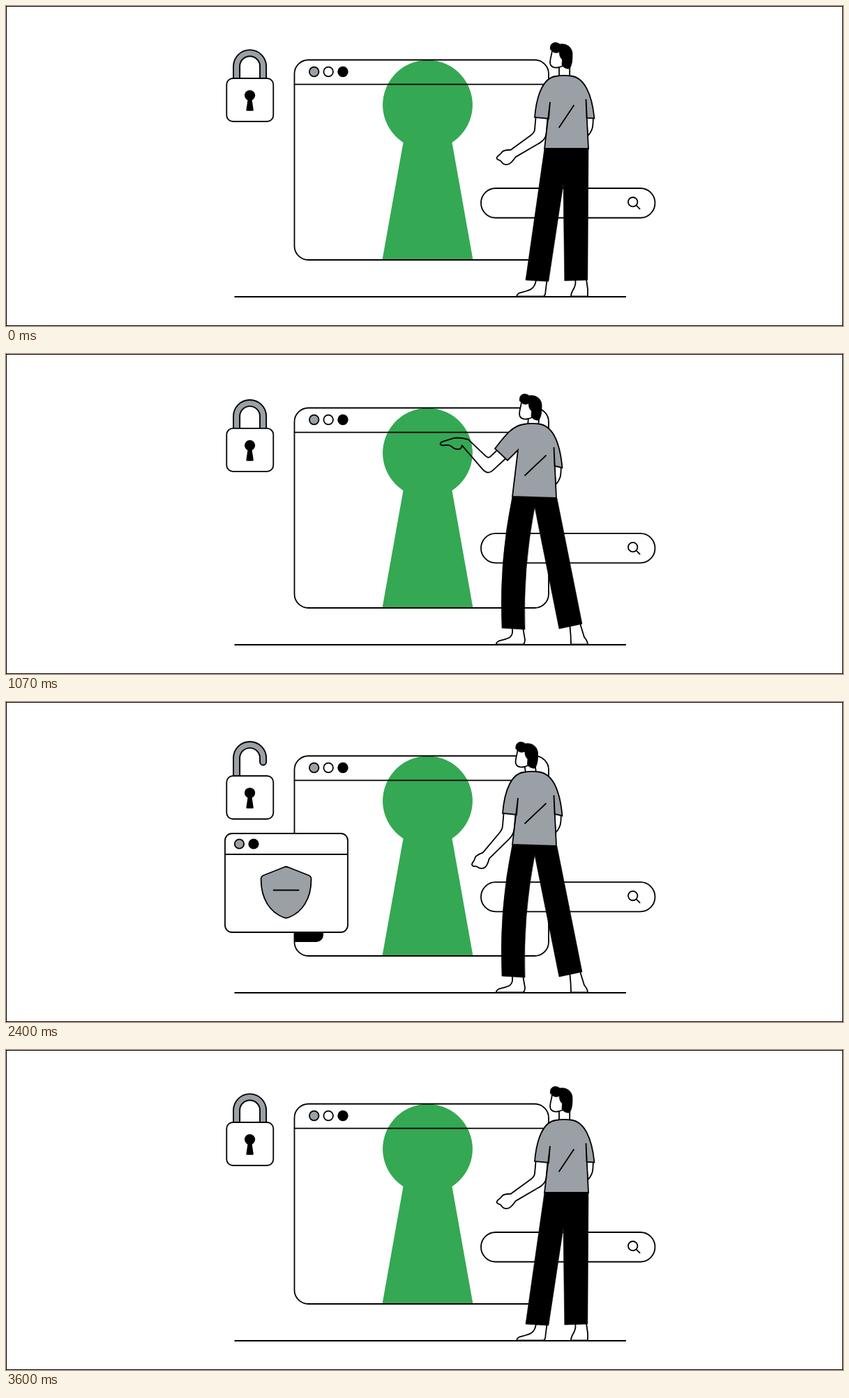
Write an HTML page that moves like this. It is 1200 px wide and 460 px high and loops after 3630 ms.

```html
<!DOCTYPE html>
<html lang="en">
<head>
<meta charset="utf-8">
<title>Unlocking the browser</title>
<style>
  html, body { margin: 0; width: 100%; height: 100%; overflow: hidden; background: #fff; }
  svg { display: block; width: 100%; height: 100%; }
  .ln { fill: none; stroke: #000; stroke-width: 1.8; stroke-linecap: round; stroke-linejoin: round; }
  .w { fill: #fff; }
  .g { fill: #9aa0a6; }
  .k { fill: #000; }
  #green { fill: #34a853; mix-blend-mode: multiply; }
</style>
</head>
<body>
<svg viewBox="0 0 1200 460">
  <defs>
    <clipPath id="inside"><rect x="413" y="77" width="365" height="288" rx="20"/></clipPath>
  </defs>
  <rect width="1200" height="460" fill="#fff"/>

  <g class="ln">
    <rect class="w" x="413.5" y="77.5" width="364.5" height="287.5" rx="20"/>
    <path d="M413.5 112.7H778"/>
    <circle class="g" cx="441.7" cy="94.5" r="6.8"/>
    <circle class="w" cx="462.2" cy="94.5" r="6.8"/>
    <circle class="k" cx="483" cy="94.5" r="6.8"/>
  </g>

  <g id="bar" class="ln">
    <rect class="w" x="681" y="262" width="249.5" height="42.5" rx="21.2"/>
    <circle cx="898.7" cy="281.7" r="6.7"/>
    <path d="M903.6 286.6l5 5"/>
  </g>

  <g id="lock">
    <path class="ln" data-arch style="stroke-width:11"/>
    <path class="ln" data-arch style="stroke-width:7.2;stroke:#9aa0a6"/>
    <rect class="ln w" x="316.3" y="104" width="67" height="62" rx="9"/>
    <circle cx="349.6" cy="128.5" r="7.6"/>
    <path d="M347 132h5.2l2.6 17.5q0 1.300-1.300 1.300h-7.800q-1.300 0-1.300-1.300z"/>
  </g>

  <path id="ticks" class="ln" style="stroke-linecap:butt"/>
  <g clip-path="url(#inside)"><rect id="shade" x="-60" y="0" width="113" height="85" rx="10"/></g>
  <g id="mini" class="ln">
    <rect class="w" x="-88" y="-71" width="176" height="142" rx="10"/>
    <path d="M-88-41H88"/>
    <circle class="g" cx="-67.5" cy="-56" r="6.7"/>
    <circle class="k" cx="-47" cy="-56" r="6.7"/>
  </g>
  <g id="shield" class="ln">
    <path class="g" d="M-3-33Q0-34.500 3-33L32-21.500Q36-20 36-16C36 14 22 32 4 39Q0 41-4 39C-22 32-36 14-36-16Q-36-20-32-21.500Z"/>
    <path d="M-18 0H18"/>
  </g>

  <path class="ln" style="stroke-linecap:butt" d="M327.5 418H889"/>

  <g class="ln">
    <path id="footR" class="w"/>
    <path id="footL" class="w"/>
    <path id="pants" class="k" style="stroke-width:.6;stroke-linejoin:miter"/>
    <path id="armR" class="w" d="M832 158L842 160C841 172 843 176 834 187Z"/>
    <path id="neck" class="w"/>
    <g id="head">
      <path class="w" d="M783 64C782 74 778 80 781 85Q784 90 793 88L802 85V62Z"/>
      <path class="k" style="stroke-width:.8" d="M780.5 62C779 53 788 50 794 55C804 53 813 60 812 71C812 80 811 85 808 90Q801 91 797 85L797.5 77Q793 73 793.5 66Q786 70 780.5 62Z"/>
    </g>
    <path id="armL" class="w"/>
    <path id="shirt" class="g" style="stroke-linejoin:miter"/>
    <path id="fold"/>
  </g>

  <path id="green" d="M569.5 196.2A64.4 64.4 0 1 1 639.5 196.2L669.5 365H539.5Z"/>
  <rect x=".5" y=".5" width="1199" height="459" fill="none" stroke="#000"/>
</svg>

<script>
const LOOP = 3630;
const el = id => document.getElementById(id);
const put = (id, d) => el(id).setAttribute('d', d);
const move = (id, tf) => el(id).setAttribute('transform', tf);
const mix = (a, b, k) => a + (b - a) * k;
const at = (p, q, k) => [mix(p[0], q[0], k), mix(p[1], q[1], k)];
const xy = p => p[0].toFixed(2) + ' ' + p[1].toFixed(2);
const clamp = v => Math.min(1, Math.max(0, v));
const polar = (p, deg, r) => {
  const a = deg * Math.PI / 180;
  return [p[0] + r * Math.cos(a), p[1] + r * Math.sin(a)];
};

// Timing: eased rise, eased rise and fall, short swell
const ramp = (t, a, b) => { const u = clamp((t - a) / (b - a)); return u * u * (3 - 2 * u); };
const stay = (t, a, b, c, d) => ramp(t, a, b) - ramp(t, c, d);
const swell = (t, mid, width) => Math.exp(-(((t - mid) / width) ** 2));

// Hand outlines pointing left, measured from the wrist
const FIST = [[-14, -5], [-18, 1], [-24, 5], [-23, 9], [-18, 10], [-14, 16], [-4, 16]];
const FINGER = [[-8, -11], [-22, -11], [-35, -11], [-34, -6], [-22, -4], [-18, 4], [-8, 8]];

function limb(S, E, W, hand) {
  const normal = (p, q) => {
    const x = q[0] - p[0], y = q[1] - p[1], l = Math.hypot(x, y);
    return [-y / l, x / l];
  };
  const off = (p, n, d) => [p[0] + n[0] * d, p[1] + n[1] * d];
  const n1 = normal(S, E), n2 = normal(E, W);
  const k = 1 + n1[0] * n2[0] + n1[1] * n2[1];
  const miter = [(n1[0] + n2[0]) / k, (n1[1] + n2[1]) / k];
  const side = s => [off(S, n1, 8.5 * s), off(E, miter, 8.5 * s), off(W, n2, 6.2 * s)];
  const [a, b, c] = side(1), [d, e, f] = side(-1);
  let path = `M${xy(a)}L${xy(at(b, a, .2))}Q${xy(b)} ${xy(at(b, c, .15))}L${xy(c)}`;
  hand.forEach((p, i) => {
    path += `Q${xy(p)} ${xy(i < hand.length - 1 ? at(p, hand[i + 1], .5) : f)}`;
  });
  return path + `L${xy(at(e, f, .2))}Q${xy(e)} ${xy(at(e, d, .3))}L${xy(d)}`;
}

function drawLegs(t, dx, lean) {
  const q = stay(t, 400, 650, 3270, 3540);
  const h = dx + 46, back = 1 - q, lift = 7 * Math.sin(Math.PI * q);
  const l1 = [711 + .2 * h + 24.8 * back, 394 - .18 * h * q - lift];
  const l2 = [744 + .17 * h + 26 * back, 396 + .07 * h * q - lift];
  const r1 = [793 + .17 * h, 395], r2 = [826 + .17 * h, 388 + .13 * h];
  const hipL = [772 + dx, 204.5], hipR = [835 + dx + lean, 205 + 2.5 * lean];
  const crotch = [758 + h - 5 * back, 220 + .15 * h + 29 * back];
  const bend = Math.max(0, 1 - h / 20);
  const knee = (a, b, d) => { const m = at(a, b, .5); return [m[0] - d * bend, m[1]]; };
  put('pants', `M${xy(hipL)}Q${xy(knee(hipL, l1, 12))} ${xy(l1)}L${xy(l2)}` +
    `Q${xy(knee(l2, crotch, 10))} ${xy(crotch)}L${xy(r1)}L${xy(r2)}L${xy(hipR)}Z`);

  const toe = 732.5 - 29.5 * q, sole = 417.3 - lift;
  const tip = sole - 4 * Math.sin(Math.PI * h / 46) * q;
  const ankle = at(l1, l2, .45), heel = [l2[0] - 2.5, l2[1]];
  put('footL', `M${xy(ankle)}C${xy([toe + 25, tip - 8])} ${xy([toe + 15, tip - 8])} ` +
    `${xy([toe + 4, tip - 5])}Q${xy([toe - 1, tip - 2])} ${xy([toe, tip])}` +
    `L${xy([toe + 38, sole])}Q${xy([toe + 41, sole - 1])} ${xy([toe + 41, sole - 7])}L${xy(heel)}`);

  const a = at(r1, r2, .47), b = at(r1, r2, mix(.95, .92, q));
  put('footR', `M${xy(a)}C${xy([mix(818, 810, q), 406])} ${xy([810, 408])} ${xy([810, 417.3])}` +
    `H834Q${xy([834, 413])} ${xy([mix(834, 829, q), 407])}L${xy(b)}`);
}

function drawHead(t, dx) {
  const hx = -44 * stay(t, 420, 810, 3110, 3570) - 5.5 * stay(t, 1650, 2400, 3100, 3400);
  const hy = 5 * stay(t, 500, 690, 3250, 3560);
  const nx = (hx + dx) / 2;
  move('head', `translate(${hx} ${hy})`);
  put('neck', `M${793 + hx} ${86 + hy}L${793 + nx} 104H${808 + nx}L${808.3 + hx} ${87 + hy}`);
}

function drawTorso(t, dx, lean) {
  const raise = stay(t, 390, 680, 1650, 2250);
  const press = stay(t, 670, 980, 1750, 2150);
  const hang = stay(t, 2030, 2350, 3270, 3570);
  const near = `translate(${dx} 0)`;

  // Sleeve opening, then shoulder, elbow and wrist from joint angles
  const front = [758 - 17 * raise + 6 * press, 160 - 21 * raise - 3 * press];
  const rear = [778 - 21 * raise + 8 * press, 162 - 9 * raise];
  const shoulder = at(front, rear, .5);
  const elbow = polar(shoulder, 95 + 42 * raise, 26);
  const wrist = polar(elbow, 147 + 57 * raise + 23 * press - 14 * hang, 46 + 2 * raise);
  const turn = -18 * press - 19 * hang;
  const hand = FIST.map((f, i) => {
    const [x, y] = at(f, FINGER[i], Math.sqrt(raise));
    return polar(wrist, turn + Math.atan2(y, x) * 180 / Math.PI, Math.hypot(x, y));
  });
  move('armL', near);
  put('armL', limb(shoulder, elbow, wrist, hand));
  move('armR', `translate(${dx} ${lean})`);

  move('shirt', near);
  put('shirt', `M788 101C772 103 761 ${124 - 6 * raise} ${xy(front)}L${xy(rear)}` +
    `L780 138L772 205L835 ${205 + 2 * lean}L831.5 134L832.5 161L843.5 ${161.5 + 2 * lean}` +
    `C840 126 829 103 810 100.5Q799 99 788 101Z`);
  move('fold', near);
  put('fold', `M${814 + 6 * lean} ${143 + 3 * lean}L${793 - 3 * lean} 174.5`);
}

function drawLock(t, bob) {
  const wag = 4.6 * Math.sin(clamp((t - 1150) / 490) * 4 * Math.PI);
  move('lock', `translate(0 ${1.55 * bob}) rotate(${wag} 349.8 135)`);
  const open = stay(t, 1650, 1850, 3040, 3220);
  const top = 86.7 - 8.4 * open - 1.2 * swell(t, 1850, 60);
  const arch = `M330.6 108V${top}a19 19 0 0 1 38 0V${106 - 22 * open}`;
  document.querySelectorAll('[data-arch]').forEach(n => n.setAttribute('d', arch));
}

function drawPopup(t) {
  const pop = swell(t, 1985, 75) + swell(t, 3240, 75);
  const size = stay(t, 1700, 1985, 3240, 3520) + .12 * pop;
  const badge = stay(t, 1740, 2000, 3220, 3480) + .24 * pop;
  const cy = 260 + Math.max(0, size - 1) * 14;
  const place = (id, x, y, s) => {
    move(id, `translate(${x} ${y}) scale(${s})`);
    el(id).style.display = s > .01 ? '' : 'none';
  };
  place('mini', 402, cy, size);
  place('shade', 402, cy, size);
  place('shield', 401.6, cy + 10.5 * size, badge);

  // Ticks fly out while their tails catch up
  const p = clamp((t - 1880) / 230), v = .82;
  const i = 96 + 28 * p ** 2.4, o = 96 + 28 * p ** .8;
  put('ticks', o - i < .5 ? '' : `M${403 - i} 259H${403 - o}M${403 + i} 259H${403 + o}` +
    `M403.5 ${259 - i * v}V${259 - o * v}M403.5 ${259 + i * v}V${259 + o * v}`);
}

function draw(t) {
  const bob = 1 - Math.cos(4 * Math.PI * t / LOOP);
  const walk = stay(t, 410, 980, 3080, 3570), dx = -46 * walk;
  move('bar', `translate(0 ${-2.2 * bob})`);
  drawLock(t, bob);
  drawPopup(t);
  drawLegs(t, dx, walk);
  drawHead(t, dx);
  drawTorso(t, dx, walk);
}

function frame() {
  draw(performance.now() % LOOP);
  requestAnimationFrame(frame);
}
frame();
</script>
</body>
</html>
```
